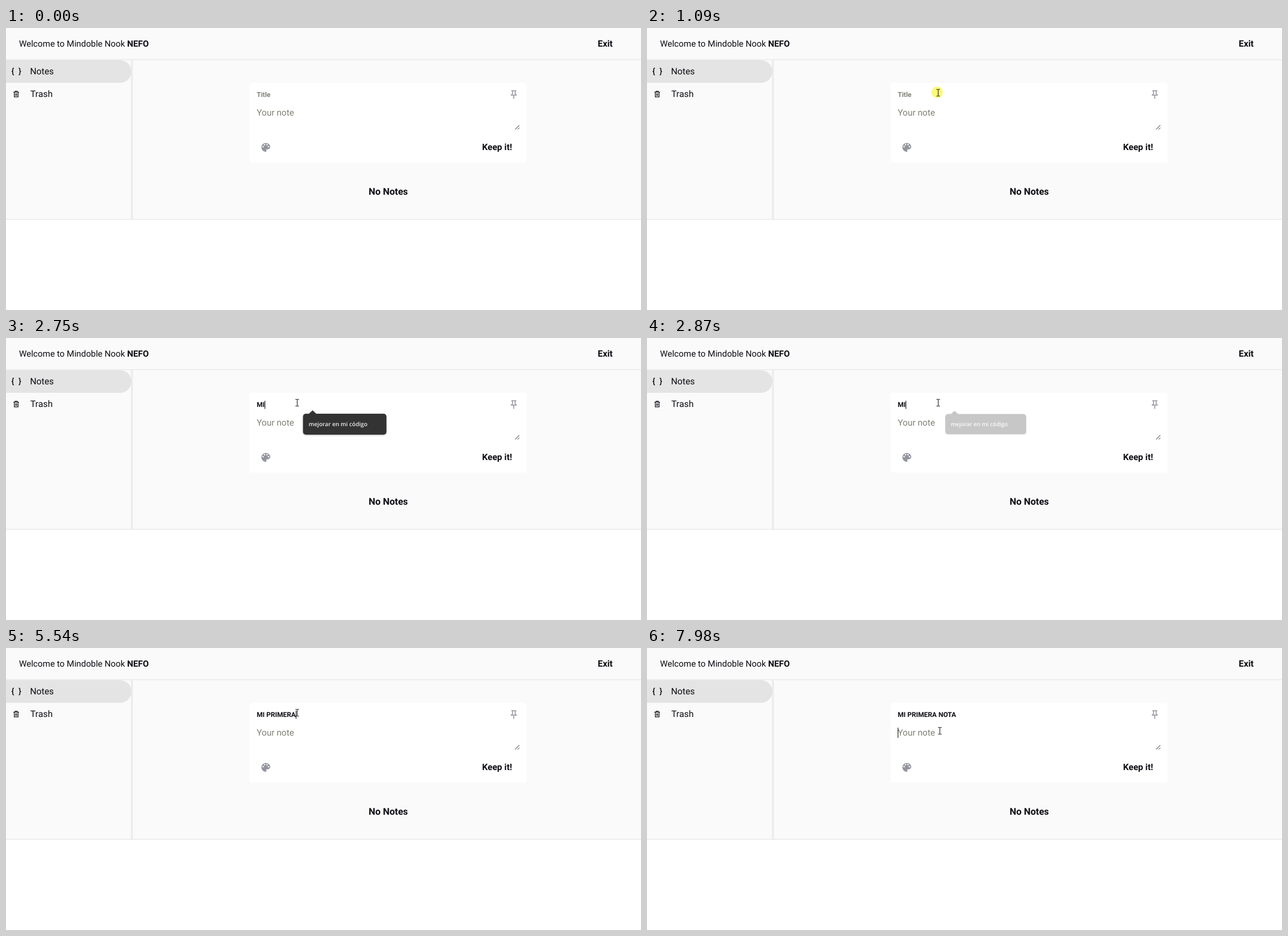
Recreate the animation shown at these times as an HTML page. Size 1122 px wide and 499 px high, loop 8000 ms.

```html
<!DOCTYPE html>
<html lang="en">
<head>
<meta charset="utf-8">
<title>Notes</title>
<style>
  html, body { margin: 0; width: 100%; height: 100%; overflow: hidden; background: #fff; }
  svg { display: block; }
  text { font: 15.5px Roboto, sans-serif; fill: #0d0d14; white-space: pre; text-rendering: geometricPrecision; }
  .b { font-weight: 700; }
  .menu { font-size: 15.8px; }
  .hint { fill: #808076; }
  .line { fill: none; stroke: #e1e1e1; }
  .ink { fill: none; stroke: #0d0d14; }
  .icon { fill: #92959d; }
  #title { font-size: 12px; font-weight: 700; }
  .pop { fill: #1f1f1f; filter: drop-shadow(0 1px 1.5px #0005); }
  .pop text { font: 600 10.2px "Open Sans", "Noto Sans", sans-serif; fill: #ececec; }
</style>
</head>
<body>
<svg width="1122" height="499" viewBox="0 0 1122 499">
  <path fill="#fafafa" d="M0 0H1122V338H0z"/>
  <path class="line" d="M0 56H1122M0 338.5H1122M221.5 57V338M223.5 57V338"/>
  <path fill="#e4e4e4" d="M0 57H201.5a20 20 0 0 1 0 40H0z"/>

  <text x="23" y="32.5" style="font-size:15.25px">Welcome to Mindoble Nook <tspan class="b" x="214">NEFO</tspan></text>
  <text class="b" x="1045.5" y="32.5" style="font-size:15.8px">Exit</text>
  <text class="menu" x="42.5" y="82">Notes</text>
  <text class="menu" x="43" y="122">Trash</text>

  <path class="ink" stroke-width="1.6" d="M14 71q-2 0-2 2v2q0 2-2 2q2 0 2 2v2q0 2 2 2M22.5 71q2 0 2 2v2q0 2 2 2q-2 0-2 2v2q0 2-2 2"/>
  <path class="ink" stroke-width="1.2" d="M13 113.5H23M16 113V111.8H20V113M14.6 113.5V121.8H21.4V113.5M17 115.5V120M19 115.5V120"/>

  <rect x="430" y="97" width="490" height="141.5" rx="5" fill="#fff"/>
  <text id="title" x="443" y="122"></text>
  <text class="hint" x="443" y="155">Your note</text>
  <text class="b" x="841.3" y="216" style="font-size:15.6px">Keep it!</text>
  <text class="b" x="640.7" y="294.5" style="font-size:16.6px">No Notes</text>
  <path class="ink" stroke-width=".9" d="M899.5 179.5L907 172M904 179.5L907 176.5"/>
  <path class="icon" transform="translate(887.9 108.6) scale(.78)" d="M14 4v5c0 1.12.37 2.16 1 3H9c.65-.86 1-1.9 1-3V4h4m3-2H7c-.55 0-1 .45-1 1s.45 1 1 1h1v5c0 1.66-1.34 3-3 3v2h5.97v7l1 1 1-1v-7H19v-2c-1.66 0-3-1.34-3-3V4h1c.55 0 1-.45 1-1s-.45-1-1-1z"/>
  <g transform="translate(448.6 200.8) scale(.87)">
    <path class="icon" d="M12 3a9 9 0 0 0 0 18c.83 0 1.5-.67 1.5-1.5 0-.39-.15-.74-.39-1.01-.23-.26-.38-.61-.38-.99 0-.83.67-1.5 1.5-1.5H16c2.76 0 5-2.24 5-5 0-4.42-4.03-8-9-8z"/>
    <path stroke="#fff" stroke-width="3" stroke-linecap="round" d="M6.5 10.5h0M9.5 6.5h0M14.5 6.5h0M17.5 10.5h0"/>
  </g>

  <path id="caret" stroke="#000"/>
  <g id="list" class="pop">
    <path d="M534 135L541.5 128L549 135z"/>
    <rect x="524.5" y="134" width="141" height="186" rx="5"/>
  </g>
  <g id="match" class="pop">
    <path d="M534 135L541.5 128L549 135z"/>
    <rect x="524.5" y="134" width="148" height="37" rx="5"/>
    <text x="534.5" y="156.5">mejorar en mi código</text>
  </g>
  <circle id="halo" r="10" fill="#fdfa78"/>
  <g id="mouse">
    <path id="arrow" fill="#fff" stroke="#000" stroke-width=".9" d="M0 0V12.5l3-2.8 2 4.6 2-.9-2-4.5h4z"/>
    <path id="beam" class="ink" d="M-3-6h2.5l.5.5.5-.5H3M0-5.5V5.5M-3 6h2.5l.5-.5.5.5H3"/>
  </g>
</svg>
<script>
const $ = id => document.getElementById(id);
const LOOP = 8000, BLINK = 510;
const CLICK = 1140, CLICK2 = 7860;
const TEXT = 'MI PRIMERA NOTA';
const KEYS = [2520, 2720, 3030, 3630, 3860, 4570, 5110, 5210, 5460, 5540, 5840, 6190, 6320, 6580, 6650];

['clases', 'hacer la atrea', 'HOLA COMO ESTAS', 'REVOGER', 'hacer la tarea', 'dfgdfgdf'].forEach((word, i) => {
  const item = document.createElementNS('http://www.w3.org/2000/svg', 'text');
  item.setAttribute('x', 534.5);
  item.setAttribute('y', 156.5 + i * 29.8);
  item.textContent = word;
  $('list').append(item);
});

const ramp = (t, a, b) => Math.min(1, Math.max(0, (t - a) / (b - a)));
const ease = u => u * u * (3 - 2 * u);
const bezier = (u, a, b, c) => (1 - u) ** 2 * a + 2 * u * (1 - u) * b + u * u * c;
const within = (t, a, b) => t >= a && t < b;
const show = (id, on) => { $(id).style.display = on ? '' : 'none'; };
const move = (id, x, y) => $(id).setAttribute('transform', `translate(${x} ${y})`);

function drawMouse(t) {
  const come = ease(ramp(t, 90, 880)), down = ease(ramp(t, 7330, 7440));
  const x = bezier(come, 1070, 560, 514.5) + 3 * down;
  const y = bezier(come, 490, -25, 114.5) + 32 * down;
  const overInput = x > 443 && x < 907 && (within(y, 105, 131) || within(y, 140, 182));
  show('mouse', t >= 90);
  show('beam', overInput);
  show('arrow', !overInput);
  move('mouse', x, y);
  show('halo', within(t, 1090, 1240) || within(t, 7800, 7980));
  move('halo', x - 2, y - .7);
}

function drawTyping(t) {
  const count = KEYS.filter(k => k <= t).length;
  const title = $('title');
  title.textContent = count ? TEXT.slice(0, count) : 'Title';
  title.setAttribute('class', count ? '' : 'hint');

  const inBody = t >= CLICK2;
  const since = inBody ? CLICK2 : count ? KEYS[count - 1] : CLICK;
  const width = count && !inBody ? title.getComputedTextLength() : 0;
  const x = Math.round(443 + width) + .5;
  show('caret', t >= CLICK && Math.floor((t - since) / BLINK) % 2 === 0);
  $('caret').setAttribute('d', inBody ? `M${x} 141V159` : `M${x} 111V125.5`);
}

function drawPopups(t) {
  show('list', within(t, CLICK, 2550));
  $('list').style.opacity = ramp(t, CLICK - 20, 1240);

  const gone = ramp(t, 2735, 2915), scale = 1 - .045 * gone;
  show('match', within(t, 2550, 2915));
  $('match').style.opacity = 1 - gone;
  $('match').setAttribute('transform', `translate(598.5 152) scale(${scale}) translate(-598.5 -152)`);
}

function frame(now) {
  const t = now % LOOP;
  drawMouse(t);
  drawTyping(t);
  drawPopups(t);
  requestAnimationFrame(frame);
}
requestAnimationFrame(frame);
</script>
</body>
</html>
```
